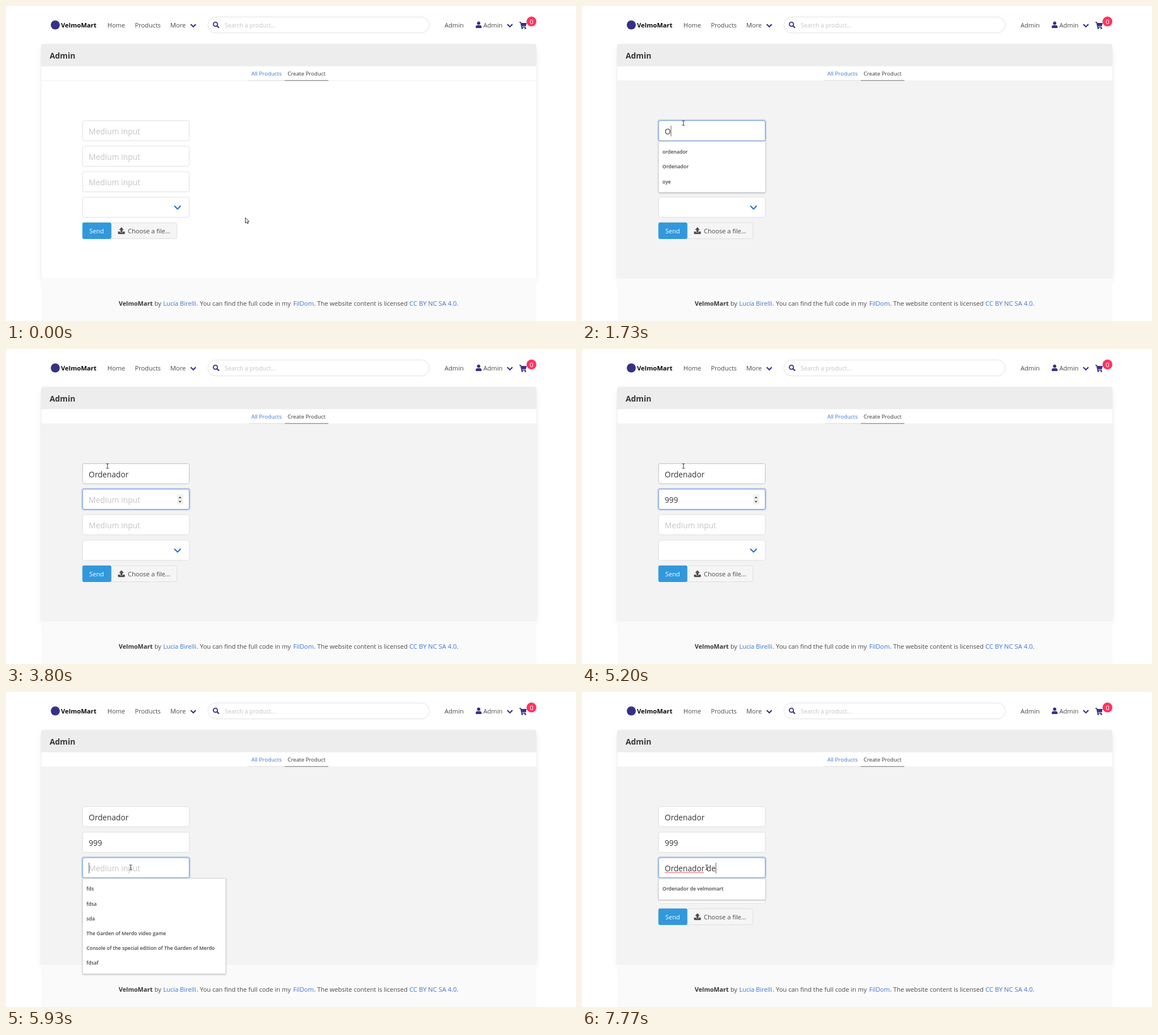
Recreate the animation shown at these times as an HTML page with a canvas. Size 1006 by 557 pixels, loop 8 s.

```html
<!DOCTYPE html>
<html lang="en">
<head>
<meta charset="utf-8">
<title>Create Product</title>
<style>
  html, body { margin: 0; width: 100%; height: 100%; overflow: hidden; background: #fff; }
  canvas { display: block; }
</style>
</head>
<body>
<canvas id="stage" width="1006" height="557"></canvas>
<script>
const ctx = document.getElementById('stage').getContext('2d');
const LOOP = 8000;
const BLINK = 530;
const HAIR = .8;
const NAVY = '#363188', LINK = '#3c76d2', INK = '#4a4a4a', DARK = '#363636', LINE = '#d8d8d8';
const FIELD = { x: 134.8, w: 189, h: 36.4, top: 202.3, pitch: 45.14 };
const fieldTop = i => FIELD.top + i * FIELD.pitch;

const shop = 'VelmoMart';
const game = 'The Garden of Merdo';
const nameHints = ['ordenador', 'Ordenador', 'oye'];
const textHints = ['fds', 'fdsa', 'sda', game + ' video game',
  'Console of the special edition of ' + game, 'fdsaf'];

// Per field: when it gains and loses focus, what is typed, and when each key lands.
const inputs = [
  { from: 970, to: 3270, text: 'Ordenador',
    keys: [1700, 2070, 2400, 2500, 2600, 2700, 2800, 2900, 3000] },
  { from: 3270, to: 5900, text: '999', keys: [4400, 4530, 4670] },
  { from: 5900, to: LOOP, text: 'Ordenador de',
    keys: [6530, 6670, 6770, 6830, 6900, 6970, 7070, 7130, 7230, 7330, 7600, 7730] }
];

const mousePath = [
  [230, 422, 374], [330, 386, 314], [470, 284, 222], [600, 205, 174], [700, 180, 180],
  [800, 175, 207], [970, 175, 207], [1070, 179, 207],
  [5330, 179, 207], [5430, 184, 220], [5550, 202, 262], [5670, 216, 299], [5770, 220, 310]
];

function mouseAt(t) {
  const next = mousePath.findIndex(p => p[0] > t);
  if (next === 0) return mousePath[0].slice(1);
  if (next < 0) return mousePath[mousePath.length - 1].slice(1);
  const [t0, x0, y0] = mousePath[next - 1], [t1, x1, y1] = mousePath[next];
  const k = (t - t0) / (t1 - t0);
  return [x0 + (x1 - x0) * k, y0 + (y1 - y0) * k];
}

function text(str, x, y, size, color = INK, weight = 400) {
  ctx.font = `${weight} ${size}px "Open Sans", "Noto Sans", sans-serif`;
  ctx.fillStyle = color;
  ctx.fillText(str, x, y);
  return ctx.measureText(str).width;
}

function rect(x, y, w, h, color) {
  ctx.fillStyle = color;
  ctx.fillRect(x, y, w, h);
}

function box(x, y, w, h, r, fill, stroke, width = 1) {
  ctx.beginPath();
  ctx.roundRect(x, y, w, h, r);
  if (fill) { ctx.fillStyle = fill; ctx.fill(); }
  if (stroke) { ctx.strokeStyle = stroke; ctx.lineWidth = width; ctx.stroke(); }
}

// A box whose thin border lies inside the given bounds.
function borderBox(x, y, w, h, r, fill, stroke) {
  box(x + HAIR / 2, y + HAIR / 2, w - HAIR, h - HAIR, r, fill, stroke, HAIR);
}

function disc(x, y, r, color) {
  ctx.beginPath();
  ctx.arc(x, y, r, 0, Math.PI * 2);
  ctx.fillStyle = color;
  ctx.fill();
}

function polygon(points, color) {
  ctx.beginPath();
  points.forEach(([x, y]) => ctx.lineTo(x, y));
  ctx.closePath();
  ctx.fillStyle = color;
  ctx.fill();
}

function line(points, color, width = 1) {
  ctx.beginPath();
  points.forEach(([x, y]) => ctx.lineTo(x, y));
  ctx.strokeStyle = color;
  ctx.lineWidth = width;
  ctx.stroke();
}

function chevron(x, y, half, color) {
  line([[x - half, y - half / 2], [x, y + half / 2], [x + half, y - half / 2]], color, 2.2);
}

function withShadow(color, blur, dy, draw) {
  ctx.save();
  ctx.shadowColor = color;
  ctx.shadowBlur = blur;
  ctx.shadowOffsetY = dy;
  draw();
  ctx.restore();
}

function drawCart(x, y) {
  line([[x, y], [x + 2.3, y], [x + 4.2, y + 8.6], [x + 11.3, y + 8.6]], NAVY, 1.5);
  polygon([[x + 2.5, y + 1.2], [x + 13, y + 1.2], [x + 11.6, y + 7], [x + 3.7, y + 7]], NAVY);
  disc(x + 5, y + 10.7, 1.4, NAVY);
  disc(x + 10.5, y + 10.7, 1.4, NAVY);
}

function drawNav() {
  disc(87, 33.5, 8, NAVY);
  text(shop, 97, 37.5, 11.25, '#0a0a0a', 700);
  text('Home', 179, 38, 11.05);
  text('Products', 227.5, 38, 11.05);
  text('More', 290, 38, 11.1);
  chevron(330.5, 34.5, 4.5, NAVY);

  borderBox(356, 19, 391.5, 29, 14.5, '#fff', LINE);
  ctx.beginPath();
  ctx.arc(369.6, 32.2, 3.6, 0, Math.PI * 2);
  ctx.strokeStyle = NAVY;
  ctx.lineWidth = 1.9;
  ctx.stroke();
  line([[372.3, 34.9], [376, 38.5]], NAVY, 2.3);
  text('Search a product...', 386, 38.3, 10.35, '#c5c5c5');

  text('Admin', 774, 38, 11.1);
  disc(834.2, 30.3, 2.9, NAVY);
  box(829, 33.9, 10.4, 5.1, [3.2, 3.2, 1, 1], NAVY);
  text('Admin', 842.5, 37.5, 11.1);
  chevron(889.3, 34.5, 4.5, NAVY);
  drawCart(906, 28.8);
  disc(927.4, 27.3, 8.7, '#fb3660');
  text('0', 924.4, 31.8, 10.8, '#fff');
}

function drawPanel(t) {
  withShadow('rgba(10,10,10,.1)', 11.6, 5.8, () => box(63.5, 68.5, 871, 412, 4.4, '#fff'));
  box(62, 67, 874, 415, 4.4, '#fff', 'rgba(10,10,10,.03)');
  box(62, 67, 874, 39.5, [4.4, 4.4, 0, 0], '#ededed');
  text('Admin', 77, 92.5, 13.9, DARK, 700);

  if (t >= 970) rect(62, 131.5, 874, 350.5, '#f3f3f3');
  else rect(62, 131.5, 874, 1, '#ededed');
  rect(428, 131.4, 64, HAIR, LINE);
  rect(492, 131.4, 77, HAIR, INK);
  text('All Products', 433, 123, 9.7, LINK);
  text('Create Product', 497, 123, 9.6, DARK);
}

function drawFooter() {
  rect(62, 482, 874, 75, '#fafafa');
  const y = 530, size = 11.03;
  text(shop, 199, y, 10.75, DARK, 700);
  text('by', 262, y, size);
  text('Lucía Birelli', 277.5, y, size, LINK);
  text('. You can find the full code in my', 336.5, y, size);
  text('FilDom', 507, y, size, LINK);
  text('. The website content is licensed', 543.5, y, size);
  const width = text('CC BY NC SA 4.0', 712, y, 11.2, LINK);
  text('.', 712 + width, y, size);
}

function drawFrame(i, focused, hovered) {
  const { x, w, h } = FIELD, y = fieldTop(i);
  if (focused) box(x - .9, y - .9, w + 1.8, h + 1.8, 3.8, null, 'rgba(50,115,220,.25)', 1.8);
  const border = focused ? '#3f78d8' : hovered ? '#b0b0b0' : LINE;
  borderBox(x, y, w, h, 2.9, '#fff', border);
}

function drawSpinner() {
  rect(302, 257, 11, 18, '#f1f1f1');
  polygon([[304.3, 263.8], [307.1, 260.7], [309.9, 263.8]], '#505050');
  polygon([[304.3, 268.7], [307.1, 271.8], [309.9, 268.7]], '#505050');
}

function squiggle(x, y, width) {
  const points = [];
  for (let d = 0; d <= width; d += 1.5) points.push([x + d, y + (points.length % 2 ? -.7 : .7)]);
  line(points, '#e5404a', 1);
}

function drawInput(input, i, t, hovered) {
  const focused = t >= input.from && t < input.to;
  drawFrame(i, focused, hovered);
  const baseline = fieldTop(i) + 24.2;
  const typed = input.text.slice(0, input.keys.filter(k => t >= k).length);
  let width = 0;
  if (typed) width = text(typed, 146, baseline, 13.7, DARK);
  else text('Medium input', 146, baseline, 13.83, '#c5c5c5');

  if (i === 1 && focused) drawSpinner();
  if (i === 2 && typed.includes(' ')) {
    squiggle(146, baseline + 2.4, ctx.measureText('Ordenador').width);
  }
  const lastEvent = Math.max(input.from, ...input.keys.filter(k => k <= t));
  if (focused && Math.floor((t - lastEvent) / BLINK) % 2 === 0) {
    rect(146 + width, baseline - 15, HAIR, 19, DARK);
  }
}

function drawForm(t, hovered) {
  inputs.forEach((input, i) => drawInput(input, i, t, i === hovered));
  drawFrame(3, false, hovered === 3);
  chevron(302.7, 356.2, 5.6, '#2b76c8');

  const y = fieldTop(4);
  borderBox(185.8, y, 116.4, 29.1, 2.9, '#f5f5f5', LINE);
  box(FIELD.x, y, 51, 29.1, 2.9, '#3298dc');
  text('Send', 147, 402, 11.1, '#fff');
  polygon([[203.7, 391.3], [208, 395.8], [205.4, 395.8], [205.4, 399.8],
    [202, 399.8], [202, 395.8], [199.4, 395.8]], INK);
  box(197.7, 398.7, 12, 4.6, 1, INK);
  rect(201, 398, 5.4, 2.3, '#f5f5f5');
  rect(202, 396, 3.4, 3.8, INK);
  text('Choose a file...', 215, 402, 11.05);
}

function drawHints(field, width, items) {
  const top = fieldTop(field) + FIELD.h + .3;
  const height = items.length * 26.2 + 12.2;
  withShadow('rgba(0,0,0,.28)', 3, 1, () => box(135, top, width, height, 1, '#fff'));
  borderBox(134.7, top, width + .6, height, 1, null, '#cdcdcd');
  items.forEach((item, i) => text(item, 142, top + 22.2 + i * 26.2, 8.75, '#454545', 600));
}

function drawDropdown(t) {
  if (t >= 1700 && t < 3270) {
    drawHints(0, 189, t < 2070 ? nameHints : nameHints.slice(0, 2));
  } else if (t >= 5900) {
    const typing = t >= inputs[2].keys[0];
    if (typing) drawHints(2, 189, ['Ordenador de ' + shop.toLowerCase()]);
    else drawHints(2, 253, textHints);
  }
}

function drawArrow(x, y) {
  const shape = [[0, 0], [0, 9.6], [2.2, 7.6], [3.7, 10.8], [5.1, 10.1], [3.7, 7.1], [6.5, 7]]
    .map(([dx, dy]) => [x + dx + .5, y + dy + .3]);
  polygon(shape, '#fff');
  line([...shape, shape[0]], '#222', .9);
}

function drawBeam(x, y) {
  rect(x - .5, y - 4, 1, 8, '#333');
  rect(x - 2.5, y - 4.5, 5, 1, '#444');
  rect(x - 2.5, y + 3.5, 5, 1, '#444');
}

function hoveredField(x, y) {
  if (x < FIELD.x || x > FIELD.x + FIELD.w) return -1;
  return [0, 1, 2, 3].findIndex(i => y >= fieldTop(i) && y <= fieldTop(i) + FIELD.h);
}

function render() {
  const t = performance.now() % LOOP;
  const [x, y] = mouseAt(t);
  const hovered = hoveredField(x, y);
  rect(0, 0, 1006, 557, '#fff');
  drawNav();
  drawPanel(t);
  drawFooter();
  drawForm(t, hovered);
  drawDropdown(t);
  if (hovered >= 0 && hovered < 3) drawBeam(x, y);
  else drawArrow(x, y);
  requestAnimationFrame(render);
}
render();
</script>
</body>
</html>
```
